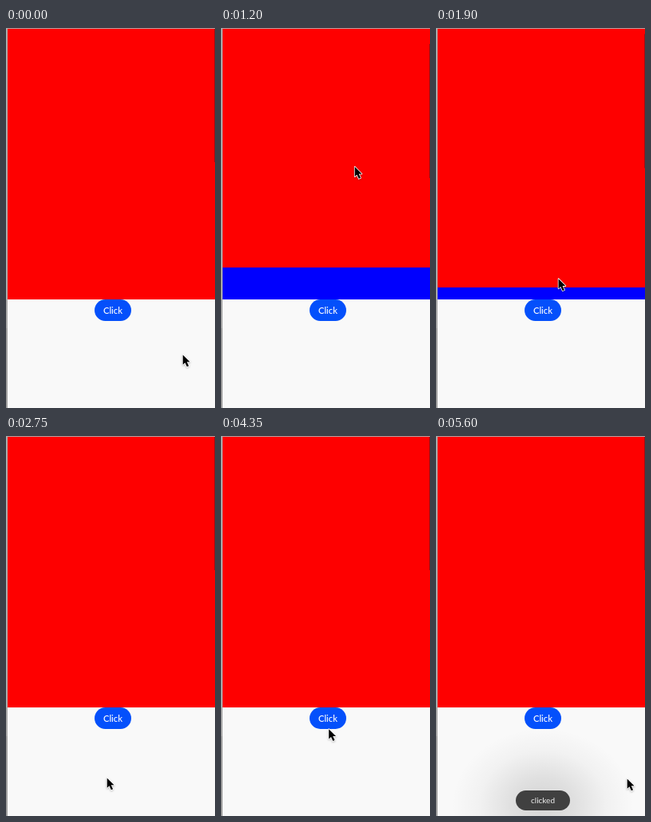
An HTML page for the animation above (5650 ms loop, 262x476 px).

```html
<!DOCTYPE html>
<html lang="en">
<head>
<meta charset="utf-8">
<title>Swipe and click</title>
<style>
  html, body { margin: 0; width: 100%; height: 100%; overflow: hidden; background: #f9f9f9; }
  #stage { position: relative; width: 262px; height: 476px; overflow: hidden; }
  #stage * { position: absolute; box-sizing: border-box; }
  #pager { left: 2px; top: 0; width: 260px; height: 340px; overflow: hidden; background: #fe0000; }
  #next { left: 0; top: 340px; width: 260px; height: 340px; background: #0000fe; }
  #bar { right: 0; top: 0; width: 1px; height: 168px; background: rgba(24,36,49,.4); }
  #top { left: 0; top: 0; width: 262px; height: 1px; background: #b3a3a3; }
  #edge { left: 0; top: 0; width: 2px; height: 476px; background: linear-gradient(#aaa 376px, #a0a0a0 376px); }
  .pill { border-radius: 14px; text-align: center; font-family: Lato, sans-serif; }
  #button { left: 111px; top: 339.5px; width: 46px; height: 27.5px; line-height: 28px;
    background: #0450fb; color: #fff; font-size: 11.3px; font-weight: 500; }
  #notice { left: 0; top: 341px; width: 262px; height: 135px; opacity: 0; }
  #glow { left: 2px; top: 0; width: 260px; height: 135px;
    background: radial-gradient(ellipse 114px 96px at 132px 121px,
      rgba(0,0,0,.15), rgba(0,0,0,.1) 35%, rgba(0,0,0,.03) 70%, transparent); }
  #toast { left: 100px; top: 103px; width: 68px; height: 25px; line-height: 25px;
    background: #404040; color: #eee; font-size: 10px; }
  #cursor { left: 0; top: 0; width: 12px; height: 18px; overflow: visible;
    filter: drop-shadow(0 1px 1px rgba(0,0,0,.25)); }
</style>
</head>
<body>
<div id="stage">
  <div id="pager"><div id="next"></div><div id="bar"></div></div>
  <div id="top"></div>
  <div id="edge"></div>
  <div id="notice"><div id="glow"></div><div id="toast" class="pill">clicked</div></div>
  <div id="button" class="pill">Click</div>
  <svg id="cursor" viewBox="0 0 12 18">
    <path transform="translate(.7 1.4) scale(.9)"
      d="M0 0V13.6L3.1 10.9L5.7 16.6L8.2 15.5L5.6 9.9H9.8Z"
      fill="#000" stroke="#fff" stroke-width="1.8" stroke-linejoin="round" paint-order="stroke"/>
  </svg>
</div>
<script>
const LOOP = 5650, STEP = 50;
const PRESS_Y = 255, DRAG_LAG = 97, BAR_RATIO = 0.5;

// Pointer moves, each eased from the previous resting place.
const home = { x: 221, y: 408 };
const moves = [
  { from: 0, to: 620, x: 167, y: PRESS_Y },
  { from: 930, to: 1400, x: 167, y: 121 },
  { from: 1550, to: 2100, x: 147, y: 392 },
  { from: 2150, to: 2550, x: 126, y: 427 },
  { from: 2750, to: 3300, x: 136, y: 359 },
  { from: 3300, to: 3700, x: 124, y: 386 },
  { from: 3950, to: 4550, x: 138, y: 359 },
  { from: 4850, to: 5400, x: 239, y: 428 }
];

const progress = (t, from, to) => Math.min(1, Math.max(0, (t - from) / (to - from)));
const ease = k => (1 - Math.cos(Math.PI * k)) / 2;

function pointerAt(t) {
  return moves.reduce((p, m) => {
    const k = ease(progress(t, m.from, m.to));
    return { x: p.x + (m.x - p.x) * k, y: p.y + (m.y - p.y) * k };
  }, home);
}

// The page follows the drag a little late.
const scrollAt = t => Math.max(0, PRESS_Y - pointerAt(t - DRAG_LAG).y);

const style = id => document.getElementById(id).style;
const cursor = style("cursor"), next = style("next"), bar = style("bar"), notice = style("notice");
const start = performance.now();

function draw() {
  const elapsed = Math.max(0, performance.now() - start);
  const t = Math.floor(elapsed % LOOP / STEP) * STEP;
  const { x, y } = pointerAt(t);
  const scroll = Math.round(scrollAt(t));
  cursor.transform = `translate(${x}px, ${y}px)`;
  next.transform = `translateY(${-scroll}px)`;
  bar.transform = `translateY(${scroll * BAR_RATIO}px)`;
  notice.opacity = progress(t, 4600, 4750);
  requestAnimationFrame(draw);
}
draw();
</script>
</body>
</html>
```
